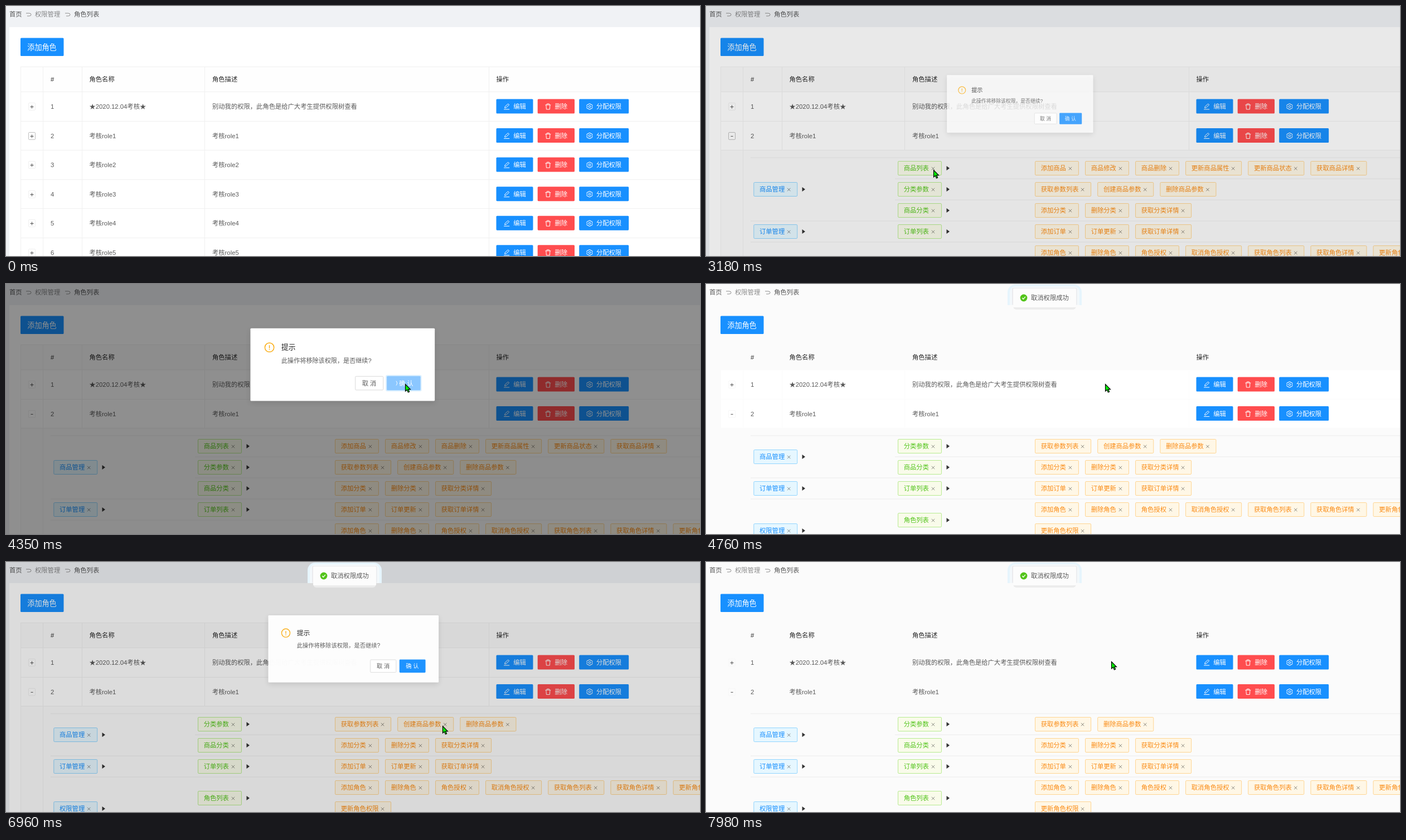
An HTML page with a canvas that plays this animation: 1245x450 px, repeating every 8000 ms.

```html
<!DOCTYPE html>
<html lang="zh-CN">
<head>
<meta charset="utf-8">
<style>
html, body { margin: 0; width: 100%; height: 100%; overflow: hidden; background: #f0f2f5; }
canvas { display: block; }
</style>
</head>
<body>
<canvas id="stage" width="1245" height="450"></canvas>
<script>
const ctx = document.getElementById('stage').getContext('2d');
const W = 1245, H = 450, LOOP = 8000;
const FONT = '"Liberation Sans", "Noto Sans CJK SC", "Noto Sans CJK", sans-serif';
const BLUE = '#1890ff', RED = '#ff4d4f', WASH = '#fbfbfb';
const ROW_TOP = 154.5, ROW_H = 52.55, LINE = 38;

// One entry per confirmation: opening, click on OK, closing, and the click point it zooms from.
const dialogs = [
  { open: 3123, click: 4200, close: 4316, x: 408, y: 295 },
  { open: 6870, click: 7675, close: 7775, x: 783, y: 295 }
];
const cursorPath = [
  [30, 972, 436], [420, 420, 270], [700, 47, 180], [830, 46, 234], [2130, 46, 234],
  [2850, 408, 295], [3320, 408, 295], [4120, 716, 180], [5000, 716, 180],
  [5780, 690, 335], [5970, 690, 335], [6480, 783, 295], [6980, 783, 295],
  [7600, 727, 179], [LOOP, 727, 179]
];
const menu = [
  ['商品管理', [
    ['商品列表', '添加商品 商品修改 商品删除 更新商品属性 更新商品状态 获取商品详情'],
    ['分类参数', '获取参数列表 创建商品参数 删除商品参数'],
    ['商品分类', '添加分类 删除分类 获取分类详情']]],
  ['订单管理', [['订单列表', '添加订单 订单更新 获取订单详情']]],
  ['权限管理', [
    ['角色列表', '添加角色 删除角色 角色授权 取消角色授权 获取角色列表 获取角色详情 更新角色信息 更新角色权限'],
    ['权限列表', '查看权限']]]
];
const tagColors = {
  blue: ['#e6f7ff', '#91d5ff', BLUE],
  green: ['#f9fbea', '#b7eb8f', '#52c41a'],
  orange: ['#fff7e6', '#ffd591', '#fa8c16']
};

const clamp = v => Math.max(0, Math.min(1, v));
const between = (t, a, b) => t >= a && t < b;
const easeOut = p => 1 - (1 - p) ** 6;
const easeInOut = p => p < .5 ? 4 * p ** 3 : 1 - 4 * (1 - p) ** 3;

function text(s, x, cy, color = 'rgba(0,0,0,.65)', size = 11.3) {
  ctx.font = `${size}px ${FONT}`;
  ctx.fillStyle = color;
  ctx.fillText(s, x, cy + size * .38);
}
function rect(x, y, w, h, color) {
  ctx.fillStyle = color;
  ctx.fillRect(x, y, w, h);
}
function box(x, y, w, h, fill, stroke, radius = 1.6) {
  ctx.beginPath();
  ctx.roundRect(x, y, w, h, radius);
  if (fill) { ctx.fillStyle = fill; ctx.fill(); }
  if (stroke) { ctx.strokeStyle = stroke; ctx.lineWidth = 1; ctx.stroke(); }
}
function stroke(d, x, y, color, width = 1) {
  ctx.save();
  ctx.translate(x, y);
  ctx.strokeStyle = color;
  ctx.lineWidth = width;
  ctx.stroke(new Path2D(d));
  ctx.restore();
}
function shape(d, x, y, fill, outline) {
  ctx.save();
  ctx.translate(x, y);
  const path = new Path2D(d);
  ctx.fillStyle = fill;
  ctx.fill(path);
  if (outline) { ctx.strokeStyle = outline; ctx.lineWidth = 1.2; ctx.stroke(path); }
  ctx.restore();
}

const ICONS = {
  edit: 'M-5 5H5M-3.5 2.5L-3 0L2.5 -5L4.5 -3L-1 2Z',
  trash: 'M-5 -3H5M-2 -3V-5H2V-3M-3.5 -3L-3 5H3L3.5 -3',
  gear: 'M-1.5 -5H1.5L2 -3.5L4 -3.8L5.2 -1.5L4 0L5.2 1.5L4 3.8L2 3.5L1.5 5H-1.5L-2 3.5L-4 3.8L-5.2 1.5L-4 0L-5.2 -1.5L-4 -3.8L-2 -3.5ZM1.8 0A1.8 1.8 0 1 1 -1.8 0A1.8 1.8 0 1 1 1.8 0'
};
function actionButton(x, w, cy, color, icon, label) {
  box(x, cy - 13.5, w, 26, color);
  stroke(ICONS[icon], x + 18.7, cy, '#fff');
  text(label, x + 30.7, cy, '#fff');
}

function cursorAt(t) {
  const i = cursorPath.findIndex(k => k[0] > t);
  if (i < 1) return null;
  const [t0, x0, y0] = cursorPath[i - 1], [t1, x1, y1] = cursorPath[i];
  const p = (t - t0) / (t1 - t0), e = p * p * (3 - 2 * p);
  return { x: x0 + (x1 - x0) * e, y: y0 + (y1 - y0) * e };
}

function drawTag(label, x, cy, kind, cursor) {
  const [fill, border, color] = tagColors[kind];
  const w = 34.6 + 11.08 * label.length;
  const hovered = cursor && between(cursor.x, x, x + w) && Math.abs(cursor.y - cy) < 13;
  ctx.globalAlpha = hovered ? .85 : 1;
  box(x + .5, cy - 12.5, w - 1, 25, fill, border);
  text(label, x + 10.7, cy, color);
  stroke('M-2.7 -2.7L2.7 2.7M2.7 -2.7L-2.7 2.7', x + w - 15.5, cy + .5, 'rgba(0,0,0,.5)', .9);
  ctx.globalAlpha = 1;
  return w;
}
const caret = (x, cy) => shape('M0 -4L5.5 0L0 4Z', x, cy, '#333');

function drawTree(t, cursor) {
  let y = 273;
  for (const [group, items] of menu) {
    const top = y;
    rect(80, y - .5, W, 1, '#ebebeb');
    for (const [name, list] of items) {
      if (name === '商品列表' && t >= 4500) continue;
      if (y > top) rect(339, y - .5, W, 1, '#ebebeb');
      const itemTop = y;
      let x = 590;
      for (const label of list.split(' ')) {
        if (label === '创建商品参数' && t >= 7955) continue;
        if (x > 1290) { x = 590; y += LINE; }
        x += drawTag(label, x, y + 19, 'orange', cursor) + 11.1;
      }
      y += LINE;
      const mid = (itemTop + y) / 2;
      drawTag(name, 344, mid, 'green', cursor);
      caret(431.5, mid);
    }
    const mid = (top + y) / 2;
    drawTag(group, 85.3, mid, 'blue', cursor);
    caret(172.5, mid);
  }
}

function drawRow(i, t, open, look, cursor) {
  const top = ROW_TOP + ROW_H * i, cy = 181 + ROW_H * i;
  const hovered = cursor && cursor.x > 26 && between(cursor.y, top, top + ROW_H);
  rect(26, top, W, ROW_H, hovered ? '#e6f7ff' : look.row);

  const onToggle = hovered && Math.abs(cursor.x - 46.5) < 8 && Math.abs(cursor.y - cy) < 9;
  const focused = i === 1 && t < 3700;
  box(40.5, Math.round(cy) - 6.5, 12, 13, look.row,
    onToggle ? BLUE : focused ? '#bfbfbf' : look.washed ? '#f7f7f7' : '#f0f0f0');
  stroke(open && i === 1 ? 'M-2 0H2' : 'M-3 0H3M0 -3V3', 46.5, Math.round(cy) + .5, '#555');

  text(String(i + 1), 80, cy);
  text(i ? '考核role' + i : '★2020.12.04考核★', 149.5, cy);
  text(i ? '考核role' + i : '别动我的权限，此角色是给广大考生提供权限树查看', 370, cy);
  actionButton(879.5, 66, cy, BLUE, 'edit', '编辑');
  actionButton(953.7, 66.3, cy, RED, 'trash', '删除');
  actionButton(1028.2, 89, cy, BLUE, 'gear', '分配权限');
}

function drawPage(t, cursor) {
  const open = between(t, 850, 1565) || t >= 2060;
  const washed = between(t, 4520, 6860) || t >= 7975;
  const masked = dialogs.some(d => between(t, d.open, d.close + 200));
  const look = {
    washed,
    line: washed ? WASH : '#f0f0f0',
    row: washed && !between(t, 4760, 6860) ? WASH : '#fff'
  };
  rect(0, 0, W, H, washed ? WASH : '#f0f2f5');
  rect(6, 38, W, H, washed ? WASH : '#fff');

  text('首页', 6, 15);
  text('权限管理', 52, 15, 'rgba(0,0,0,.45)');
  text('角色列表', 122, 15);
  for (const x of [36, 106])
    stroke('M0 -2H5.5Q9 -2 9 .5Q9 3 5.5 3H2', x, 15, '#8c8c8c');

  box(26, 57.5, 77.5, 32.5, BLUE);
  text('添加角色', 38.3, 74, '#fff', 13.1);

  rect(26, 109, W, 45, washed ? WASH : open ? '#fafafa' : '#fefefe');
  const headings = { '#': 80, '角色名称': 149.5, '角色描述': 370, '操作': 879.5 };
  for (const name in headings) text(name, headings[name], 132, 'rgba(0,0,0,.85)');

  const rows = open ? 2 : 6;
  for (let i = 0; i < rows; i++) drawRow(i, t, open, look, washed || masked ? null : cursor);
  const bottom = ROW_TOP + ROW_H * rows;
  for (const x of [26, 66, 136, 356, 866]) rect(x, 109, 1, bottom - 109, look.line);
  rect(26, 109, W, 1, look.line);
  for (let i = 0; i <= rows; i++) rect(26, Math.floor(ROW_TOP + ROW_H * i), W, 1, look.line);

  if (open) {
    rect(26, 260, W, H, WASH);
    for (const x of [26, 66]) rect(x, 260, 1, H, look.line);
    drawTree(t, masked ? null : cursor);
  }
}

function drawDialog(t, d) {
  const entering = clamp((t - d.open) / 300);
  const staying = 1 - easeInOut(clamp((t - d.close) / 200));
  const shown = easeOut(entering) * staying;
  if (shown <= 0) return;
  rect(0, 0, W, H, `rgba(0,0,0,${.45 * entering * staying})`);

  const scale = .2 + .8 * shown;
  ctx.save();
  ctx.globalAlpha = Math.min(1, shown * 1.1);
  ctx.translate(d.x, d.y);
  ctx.scale(scale, scale);
  ctx.translate(-d.x, -d.y);

  ctx.shadowColor = 'rgba(0,0,0,.12)';
  ctx.shadowBlur = 10;
  ctx.shadowOffsetY = 3;
  box(439, 76, 336.5, 133, '#fff');
  ctx.shadowColor = 'transparent';

  stroke('M8.3 0A8.3 8.3 0 1 1 -8.3 0A8.3 8.3 0 1 1 8.3 0M0 -4V1.5M0 3V4.5', 473.7, 111, '#faad14', 1.5);
  text('提示', 495.5, 110.2, 'rgba(0,0,0,.85)', 13);
  text('此操作将移除该权限，是否继续?', 495.5, 135);

  const loading = t >= d.click;
  const grow = loading ? Math.min(18, (t - d.click) / 15) : 0;
  box(640.5 - grow, 164, 51, 25, '#fff', '#d9d9d9');
  text('取 消', 653 - grow, 176.5);
  if (loading) box(696 - grow, 161.5, 55.5 + grow, 30, '#d9efff', null, 3);
  box(698 - grow, 163.5, 51.5 + grow, 26, loading ? '#8bc7ff' : BLUE);
  text('确 认', 710.5, 176.5, '#fff');
  if (loading) stroke('M0 -4Q3.5 0 0 4', 709 - grow / 2.5, 176.5, '#fff');
  ctx.restore();
}

function drawMessage(t) {
  const first = clamp((t - 4450) / 75) * (1 - clamp((t - 7400) / 250));
  const alpha = Math.max(first, clamp((t - 7900) / 75));
  if (!alpha) return;
  ctx.save();
  ctx.globalAlpha = alpha;
  ctx.translate(0, -30 * (1 - alpha) ** 2);
  box(541, 1, 133, 37, '#e6f5fd', null, [14, 14, 0, 0]);
  box(545, 4, 125, 34, '#f3f8fb', null, [10, 10, 0, 0]);
  box(551, 20, 113, 26, '#ececec', null, 6);
  box(549, 7, 116.5, 31, '#ebebed', null, 2);
  box(551, 8, 113, 34, '#fcfcfc');
  ctx.beginPath();
  ctx.arc(570, 25, 6.4, 0, 7);
  ctx.fillStyle = '#52c41a';
  ctx.fill();
  stroke('M-2.8 0L-.8 2.2L3 -2.2', 570, 25, '#fff', 1.3);
  text('取消权限成功', 583, 25);
  ctx.restore();
}

function drawCursor(t, cursor) {
  if (!cursor) return;
  const hand = between(t, 800, 2160);
  const d = hand
    ? 'M-1 2Q.5 0 2 2V6L6 7L8 8.5V13L6.5 17H0L-1 15L-4.5 10.5V9L-3 8.5L-1 10.5Z'
    : 'M.5 .5V13L3.4 10.4L5.4 15L7.6 14L5.6 9.6H9.4Z';
  shape(d, cursor.x, cursor.y, '#00f000', '#000');
}

function frame(now) {
  const t = now % LOOP, cursor = cursorAt(t);
  drawPage(t, cursor);
  dialogs.forEach(d => drawDialog(t, d));
  drawMessage(t);
  drawCursor(t, cursor);
}

const start = performance.now();
function tick() {
  frame(performance.now() - start);
  requestAnimationFrame(tick);
}
tick();
</script>
</body>
</html>
```
